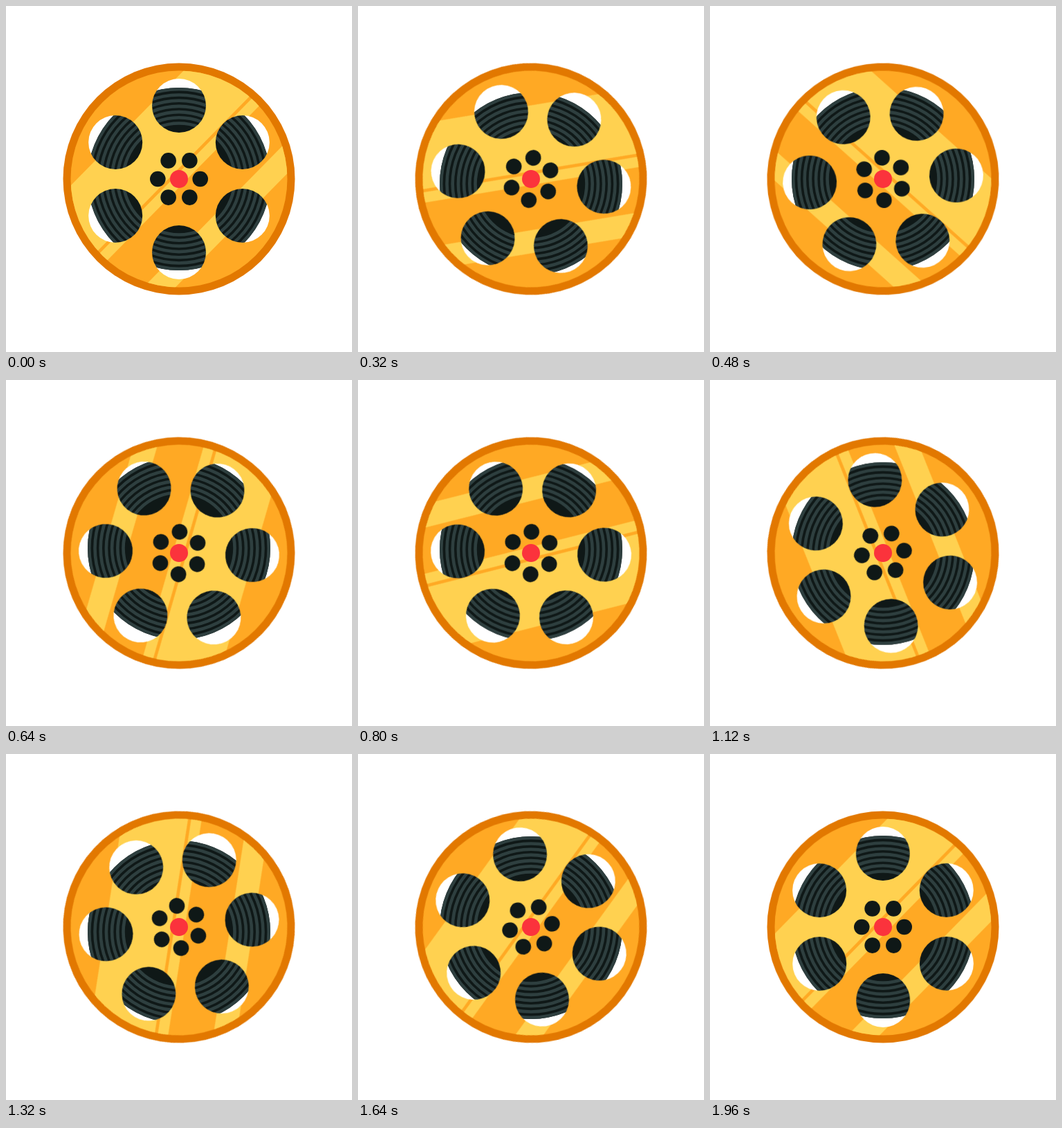
Recreate the animation shown at these times as an HTML page. Size 500 by 500 pixels, loop 2000 ms.

```html
<!DOCTYPE html>
<html lang="en">
<head>
<meta charset="utf-8">
<title>Film reel</title>
<style>
  html, body { margin: 0; width: 100%; height: 100%; overflow: hidden; background: #fff; }
  svg { display: block; width: 100vw; height: 100vh; }
  .reel { animation: spin 2s cubic-bezier(.333, 0, .285, 1) infinite; }
  .tape { animation: sway 2s ease-in-out infinite; }
  @keyframes spin { to { transform: rotate(360deg); } }
  @keyframes sway {
    0%, 100% { transform: translateY(0); }
    16% { transform: translateY(7px); }
    32% { transform: translateY(-7px); }
    48% { transform: translateY(-3.5px); }
    66% { transform: translateY(7px); }
    82% { transform: translateY(1px); }
  }
</style>
</head>
<body>
<svg viewBox="-250 -250 500 500">
  <defs>
    <clipPath id="face"><circle r="156.5"/></clipPath>
    <mask id="cut" maskUnits="userSpaceOnUse" x="-170" y="-170" width="340" height="340">
      <circle r="169" fill="#fff"/>
      <g id="holes" fill="#000"></g>
    </mask>
  </defs>
  <!-- wound film, seen through the holes -->
  <g class="tape">
    <circle r="132" fill="#0f1817"/>
    <g id="rings" fill="none" stroke="#2e3f3f" stroke-width="4.6"></g>
  </g>
  <g class="reel">
    <g mask="url(#cut)">
      <circle r="167.5" fill="#e27800"/>
      <circle r="156.5" fill="#ffa924"/>
      <g clip-path="url(#face)">
        <g transform="rotate(-45.5)" fill="#ffd150">
          <rect x="-170" y="-105" width="340" height="94"/>
          <rect x="-170" y="-6.5" width="340" height="15"/>
          <rect x="-170" y="73" width="340" height="33"/>
        </g>
      </g>
    </g>
    <g id="dots" fill="#0f1817"></g>
  </g>
  <circle r="13" fill="#fb333c"/>
</svg>
<script>
  function addCircle(parent, r, x = 0, y = 0) {
    const c = document.createElementNS('http://www.w3.org/2000/svg', 'circle');
    c.setAttribute('r', r);
    c.setAttribute('cx', x);
    c.setAttribute('cy', y);
    document.getElementById(parent).append(c);
  }

  function addSix(parent, r, distance, start) {
    for (let i = 0; i < 6; i++) {
      const a = (start + i * 60) * Math.PI / 180;
      addCircle(parent, r, distance * Math.cos(a), distance * Math.sin(a));
    }
  }

  addSix('holes', 39, 106, 30);
  addSix('dots', 11.3, 30.7, 0);
  for (let i = 0; i < 7; i++) addCircle('rings', 129.7 - i * 8.2);
</script>
</body>
</html>
```
